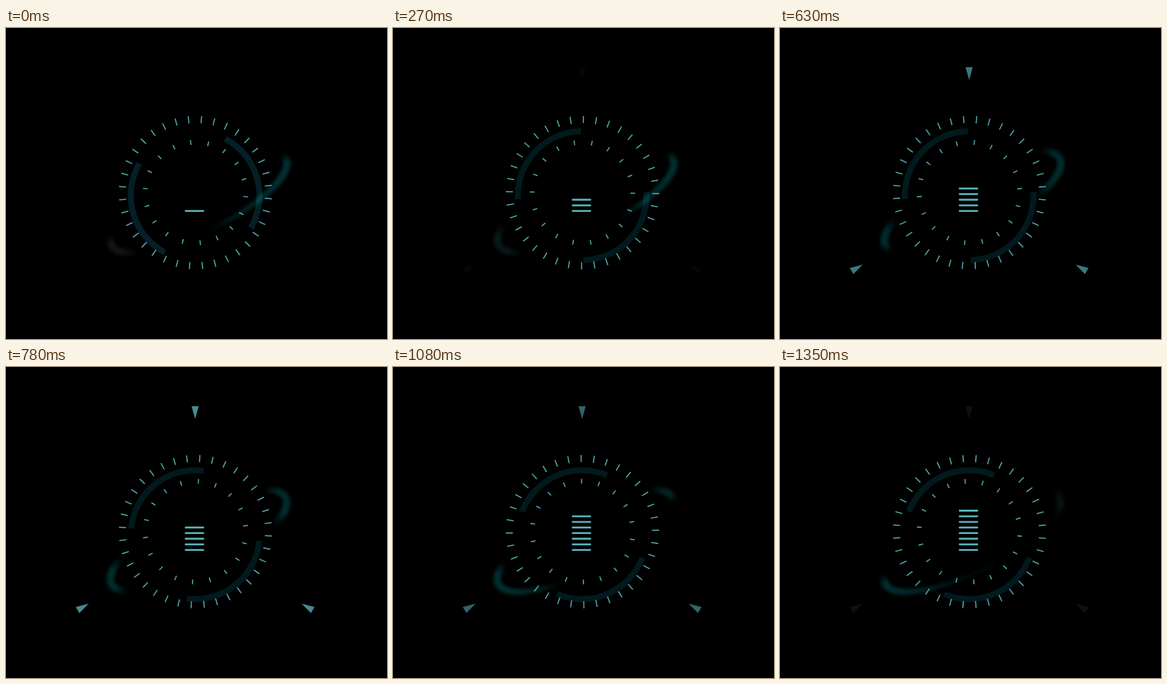
Recreate the animation shown at these times as an HTML page with a canvas. Size 564 by 460 pixels, loop 1.38 s.

```html
<!DOCTYPE html>
<html lang="en">
<head>
<meta charset="utf-8">
<title>Gauge</title>
<style>
  html, body { margin: 0; width: 100%; height: 100%; overflow: hidden; background: #000; }
  canvas { display: block; }
</style>
</head>
<body>
<canvas id="stage" width="564" height="460"></canvas>
<script>
const LOOP = 1380, STEP = 30, TAU = Math.PI * 2;
const BRIGHT = '#57b2b9';
const ctx = document.getElementById('stage').getContext('2d');
const glow = document.createElement('canvas');
glow.width = 564;
glow.height = 460;
const gtx = glow.getContext('2d');

const rad = d => d * Math.PI / 180;
const clamp = v => Math.max(0, Math.min(1, v));
const smooth = v => v * v * (3 - 2 * v);

// Piecewise linear tracks share these key times
const TIMES = [0, 270, 450, 630, 900, 1080, 1350];
function track(values, t) {
  let i = 0;
  while (i < TIMES.length - 2 && t > TIMES[i + 1]) i++;
  const p = clamp((t - TIMES[i]) / (TIMES[i + 1] - TIMES[i]));
  return values[i] + (values[i + 1] - values[i]) * p;
}

const POINTER = [0, .04, .35, .68, .86, .56, .1];
// Orbit angles of each streak's two ends, its strength and its greyness
const STREAKS = [
  { from: [86, 68, 58, 46, 22, 0, 22], to: [-18, -24, -31, -40, -45, -45, -24],
    power: [1, .95, .9, .9, .9, .8, .5], grey: [0, 0, 0, 0, 0, .1, .7] },
  { from: [190, 203, 208, 210, 210, 204, 188], to: [132, 135, 146, 156, 133, 105, 72],
    power: [.7, .6, .8, .9, 1, 1, 1], grey: [1, .5, .1, 0, 0, 0, 0] }
];

function drawTicks(t) {
  const ring = (count, offset, r0, r1) => {
    for (let i = 0; i < count; i++) {
      ctx.save();
      ctx.rotate(rad(offset) + i * TAU / count);
      ctx.moveTo(0, -r0);
      ctx.lineTo(0, -r1);
      ctx.restore();
    }
  };
  ctx.save();
  ctx.translate(280.5, 243.5);
  ctx.rotate(rad(4.6 - 20 * t / LOOP));
  ctx.beginPath();
  ring(36, 0, 103, 113.5);
  ring(18, 10, 71, 78);
  ctx.restore();
  ctx.strokeStyle = '#54a9af';
  ctx.lineWidth = 1.6;
  ctx.stroke();
}

function drawArcs(t) {
  const first = 1 - Math.pow(1 - clamp(t / 240), 3);
  const second = smooth(clamp((t - 630) / 370));
  const mid = -106 + 58.8 * first + 24.1 * second;
  const lift = 1 - clamp(t / 120);
  ctx.strokeStyle = `rgb(${2 + 2 * lift}, ${25 + 7 * lift}, ${30 + 8 * lift})`;
  ctx.lineWidth = 9;
  for (const turn of [0, 180]) {
    const a = mid + turn - 90;
    ctx.beginPath();
    ctx.arc(280, 248, 95.3, rad(a - 46), rad(a + 46));
    ctx.stroke();
  }
}

function orbit(deg) {
  return [285 + 131 * Math.cos(rad(deg)), 257 + 75.5 * Math.sin(rad(deg - 49))];
}

function drawStreaks(t) {
  gtx.clearRect(0, 0, 564, 460);
  for (const s of STREAKS) {
    const a = track(s.from, t), b = track(s.to, t);
    const power = track(s.power, t), grey = track(s.grey, t);
    const n = Math.ceil((a - b) / 2);
    gtx.strokeStyle = `rgb(${2 + 26 * grey}, ${52 - 18 * grey}, ${54 - 22 * grey})`;
    for (let i = 0; i < n; i++) {
      const p = (i + .5) / n, u = a + (b - a) * p;
      const near = Math.abs(Math.cos(rad(u)));
      const edge = Math.min(p, 1 - p) * (a - b) / 16;
      gtx.globalAlpha = power * clamp(edge) * (.25 + .75 * near);
      gtx.lineWidth = 3 + 8 * near;
      gtx.beginPath();
      gtx.moveTo(...orbit(a + (b - a) * i / n));
      gtx.lineTo(...orbit(a + (b - a) * (i + 1) / n));
      gtx.stroke();
    }
  }
  ctx.save();
  ctx.globalCompositeOperation = 'lighter';
  ctx.filter = 'blur(2px)';
  ctx.drawImage(glow, 0, 0);
  ctx.restore();
}

function drawPointers(t) {
  ctx.fillStyle = BRIGHT;
  for (let i = 0; i < 3; i++) {
    ctx.save();
    ctx.globalAlpha = track(POINTER, t);
    ctx.translate(280, 259);
    ctx.rotate(i * TAU / 3);
    ctx.beginPath();
    ctx.moveTo(-5.3, -201);
    ctx.lineTo(5.3, -201);
    ctx.lineTo(0, -182);
    ctx.fill();
    ctx.restore();
  }
}

function drawBars(t) {
  const count = Math.min(8, 1 + Math.floor((t + 150) / 190));
  ctx.strokeStyle = BRIGHT;
  ctx.lineWidth = 2.8;
  ctx.lineCap = 'round';
  ctx.beginPath();
  for (let i = 0; i < count; i++) {
    const y = 270.6 - i * 8.3;
    ctx.moveTo(266, y);
    ctx.lineTo(292, y);
  }
  ctx.stroke();
  ctx.lineCap = 'butt';
}

function draw(now) {
  const t = Math.floor((now % LOOP) / STEP) * STEP;
  ctx.fillStyle = '#000';
  ctx.fillRect(0, 0, 564, 460);
  drawArcs(t);
  drawStreaks(t);
  drawTicks(t);
  drawPointers(t);
  drawBars(t);
}

const start = performance.now();
function loop() {
  draw(performance.now() - start);
  requestAnimationFrame(loop);
}
loop();
</script>
</body>
</html>
```
